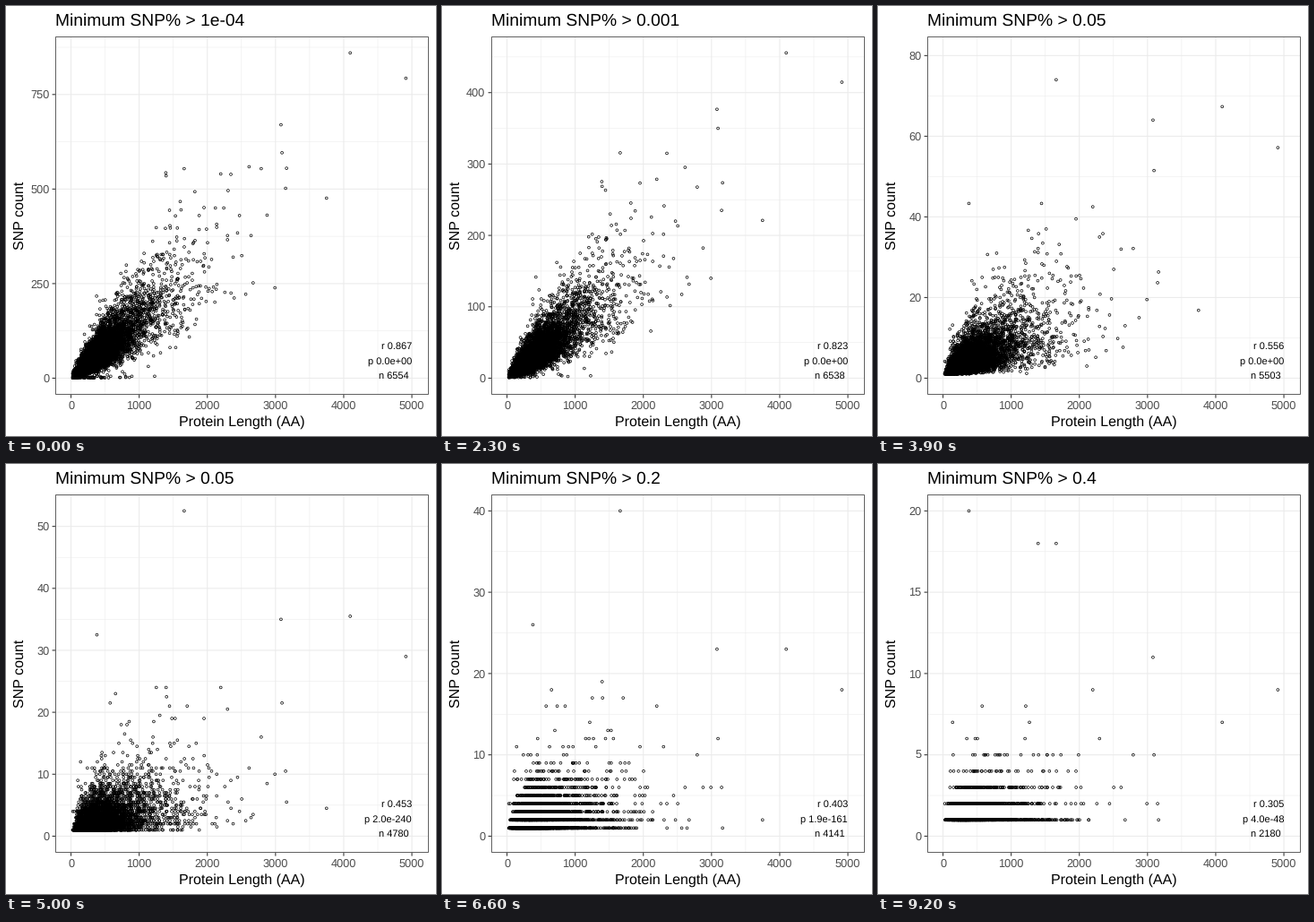
Write a matplotlib script that moves like this. It is 480 by 480 pixels and loops after 10000 ms.

```python
import numpy as np
import matplotlib.pyplot as plt
from matplotlib.animation import FuncAnimation
from matplotlib.collections import LineCollection, RegularPolyCollection
from matplotlib.patches import Rectangle

plt.rcParams["font.family"] = "Liberation Sans"
plt.rcParams["text.hinting"] = "none"

SIZE, DPI, FRAMES, INTERVAL = 480, 72, 100, 100
LEFT, RIGHT, TOP, BOTTOM = 55.6, 472.0, 34.2, 433.6
LINE = 1.07

# One entry per state: threshold, correlation, p value, sample size
STATES = [
    ("1e-04", "0.867", "0.0e+00", 6554),
    ("0.001", "0.823", "0.0e+00", 6538),
    ("0.01", "0.738", "0.0e+00", 6347),
    ("0.05", "0.556", "0.0e+00", 5503),
    ("0.1", "0.453", "2.0e-240", 4780),
    ("0.2", "0.403", "1.9e-161", 4141),
    ("0.3", "0.375", "6.8e-118", 3511),
    ("0.4", "0.305", "4.0e-48", 2180),
]
LEAVE = np.append(8, np.arange(22, FRAMES, 13))  # first moving frame after each hold
STEPS = 6

# Place of each state between the four key thresholds 1e-04, 0.01, 0.2, 0.4
WAY = np.array([0, 0.25, 1, 1.7, 1.9, 2, 2.24, 3])

# Far-out proteins: length, then counts at the key thresholds
FAR = np.array([
    (4095, 860, 189, 23, 7), (4912, 793, 168, 18, 9), (3080, 670, 174, 23, 11),
    (3095, 596, 174, 12, 5), (1660, 554, 149, 40, 18), (2790, 554, 93, 10, 5),
    (2197, 540, 110, 16, 9), (2345, 539, 155, 4, 0.4), (3148, 502, 77, 6, 2),
    (3748, 476, 71, 2, 0.4), (380, 130, 80, 26, 20), (1395, 240, 58, 19, 18),
]).T


def fade(keys):
    """Log-linear course through the key thresholds, one row per state."""
    logs = np.log(keys)
    i = np.minimum(WAY.astype(int), 2)
    f = (WAY - i)[:, None]
    return np.exp(logs[i] * (1 - f) + logs[i + 1] * f)


def random_proteins(n, caps, seed=12):
    rng = np.random.default_rng(seed)
    length = np.exp(rng.normal(np.log(395), 0.66, n))
    odd = (length < 25) | (length > 3300) | (rng.random(n) < 0.07)
    length[odd] = rng.uniform(25, 170, odd.sum())
    length = np.round(length)

    def noise(shape):
        return rng.gamma(shape, 1 / shape, n) + 1e-3

    # Counts grow with length and scatter more at each key threshold
    quiet = np.where(rng.random(n) < 0.006, 0.03, 1)
    g0 = quiet * noise(10 * length / (length + 130))
    g1 = g0 * noise(8)
    g2 = g1 * noise(3)
    g3 = g2 * noise(10)
    rates = fade(np.array([0.22 * length ** 0.95 * g0, 0.05 * length ** 0.93 * g1,
                           0.027 * length ** 0.65 * g2, 0.012 * length ** 0.6 * g3]))

    # Each stricter threshold keeps a random share of the former count
    y = np.maximum(rng.poisson(rates[0]), 1)
    counts = [y]
    for keep in rates[1:] / rates[:-1]:
        y = rng.binomial(y, np.minimum(keep, 1))
        counts.append(y)
    return length, np.minimum(counts, np.floor(0.65 * caps)[:, None])


far_counts = np.round(fade(FAR[1:]))
YMAX = far_counts.max(axis=1)
lengths, counts = random_proteins(STATES[0][3] - FAR.shape[1], YMAX)
lengths = np.append(lengths, FAR[0])
counts = np.hstack([counts, far_counts])
XMIN = [lengths[c > 0].min() for c in counts]


def nice_breaks(lo, hi, m=5):
    """Extended Wilkinson labelling: the step and ticks inside lo..hi."""
    best, span = (-9, 1, 0, 2), hi - lo
    for i, q in enumerate((1, 5, 2, 2.5, 4, 3)):
        for k in range(2, 11):
            z0 = int(np.ceil(np.log10(span / (k + 1) / q)))
            for step in (q * 10.0 ** z0, q * 10.0 ** (z0 + 1)):
                first = int(np.floor(hi / step)) - (k - 1)
                for start in range(first, int(np.ceil(lo / step)) + 1):
                    a, b = start * step, (start + k - 1) * step
                    simple = (a <= 0 <= b) - i / 5
                    cover = 1 - 0.5 * ((hi - b) ** 2 + (lo - a) ** 2) / (0.1 * span) ** 2
                    r = (k - 1) / (b - a)
                    rt = (m - 1) / (max(b, hi) - min(a, lo))
                    dense = 2 - max(r / rt, rt / r)
                    score = 0.25 * simple + 0.2 * cover + 0.5 * dense
                    if score > best[0] + 1e-9:
                        best = (score, step, start, k)
    _, step, start, k = best
    ticks = step * np.arange(start, start + k)
    return step, ticks[(ticks >= lo) & (ticks <= hi)]


def minor_breaks(step, ticks, lo, hi):
    mids = np.append(ticks - step / 2, ticks[-1] + step / 2)
    return mids[(mids > lo) & (mids < hi)]


fig = plt.figure(figsize=(SIZE / DPI, SIZE / DPI), dpi=DPI, facecolor="white")
ax = fig.add_axes([0, 0, 1, 1])
ax.set(xlim=(0, SIZE), ylim=(SIZE, 0))
ax.axis("off")


def add_lines(color, width, z):
    lines = LineCollection([], colors=color, linewidths=width, zorder=z, capstyle="butt")
    lines.set_snap(False)
    return ax.add_collection(lines, autolim=False)


def add_text(x, y, s="", size=16, color="black", **kw):
    return ax.text(x, y, s, fontsize=size, color=color, va="baseline", zorder=5, **kw)


minor = add_lines("#ebebeb", LINE / 2, 1)
major = add_lines("#ebebeb", LINE, 1.1)
ticks = add_lines("#333333", LINE, 2)

dot_area = np.pi * 1.42 ** 2
dots = RegularPolyCollection(12, sizes=(dot_area, dot_area), offsets=[(0, 0)],
                             offset_transform=ax.transData, facecolors="none",
                             edgecolors="black", linewidths=0.71, zorder=3)
dots.set_snap(False)
ax.add_collection(dots, autolim=False)
ax.add_patch(Rectangle((55.5, 34.5), 416, 399, fill=False, ec="#626262", lw=1,
                       snap=False, zorder=4))

title = add_text(LEFT - 0.6, 22, size=19.2)
add_text((LEFT + RIGHT) / 2, 469, "Protein Length (AA)", ha="center")
add_text(20, (TOP + BOTTOM) / 2 - 0.5, "SNP count", rotation=90,
         rotation_mode="anchor", ha="center")
x_labels = [add_text(0, 450, f"{1000 * i}", 12.8, "#4d4d4d", ha="center") for i in range(6)]
y_labels = [add_text(48.4, 0, "", 12.8, "#4d4d4d", ha="right") for _ in range(11)]
stats = [add_text(x, y, size=11.04, ha="right")
         for x, y in ((453.1, 383), (453.1, 399.3), (450, 415.7))]


def pose(frame):
    """States on both sides of this frame and the way gone between them."""
    k = int((LEAVE <= frame).sum())
    if k:
        step = frame - LEAVE[k - 1] + 1
        if step < STEPS:
            return k - 1, k, step / STEPS
    return k, k, 0.0


def update(frame):
    a, b, t = pose(frame)

    def mix(v):
        return v[a] + (v[b] - v[a]) * t

    xmin, ymax = mix(XMIN), mix(YMAX)
    sx = (RIGHT - LEFT) / 1.1 / (lengths.max() - xmin)
    sy = (BOTTOM - TOP) / 1.1 / ymax

    def px(v):
        return LEFT + (RIGHT - LEFT) / 22 + (v - xmin) * sx

    def py(v):
        return BOTTOM - (BOTTOM - TOP) / 22 - v * sy

    shown = (counts[a] > 0) & (counts[b] > 0)
    dots.set_offsets(np.column_stack([px(lengths), py(mix(counts))])[shown])

    lo, hi = -0.05 * ymax, 1.05 * ymax
    step, yt = nice_breaks(lo, hi)
    xs, ys = px(np.arange(0, 5001, 1000)), py(yt)

    def grid(xv, yv):
        return ([[(x, TOP), (x, BOTTOM)] for x in xv]
                + [[(LEFT, y), (RIGHT, y)] for y in yv])

    minor.set_segments(grid(px(np.arange(500, 5000, 1000)),
                            py(minor_breaks(step, yt, lo, hi))))
    major.set_segments(grid(xs, ys))
    ticks.set_segments([[(x, BOTTOM), (x, BOTTOM + 4)] for x in xs]
                       + [[(LEFT - 4, y), (LEFT, y)] for y in ys])

    for label, x in zip(x_labels, xs):
        label.set_x(x)
    for i, label in enumerate(y_labels):
        if i < len(yt):
            label.set_text(f"{yt[i]:g}")
            label.set_y(ys[i] + 4.5)
        else:
            label.set_text("")

    title.set_text(f"Minimum SNP% > {STATES[b if t > 0.5 else a][0]}")
    _, r, p, n = STATES[b if t >= 0.5 else a]
    for label, s in zip(stats, (f"r {r}", f"p {p}", f"n {n}")):
        label.set_text(s)
    return []


# The x axis is scaled to the 5000 mark, where the statistics stand
lengths = np.append(lengths, 5000)
counts = np.hstack([counts, np.zeros((len(STATES), 1))])

anim = FuncAnimation(fig, update, frames=FRAMES, interval=INTERVAL,
                     repeat=True, repeat_delay=0, blit=False)
plt.show()
```
